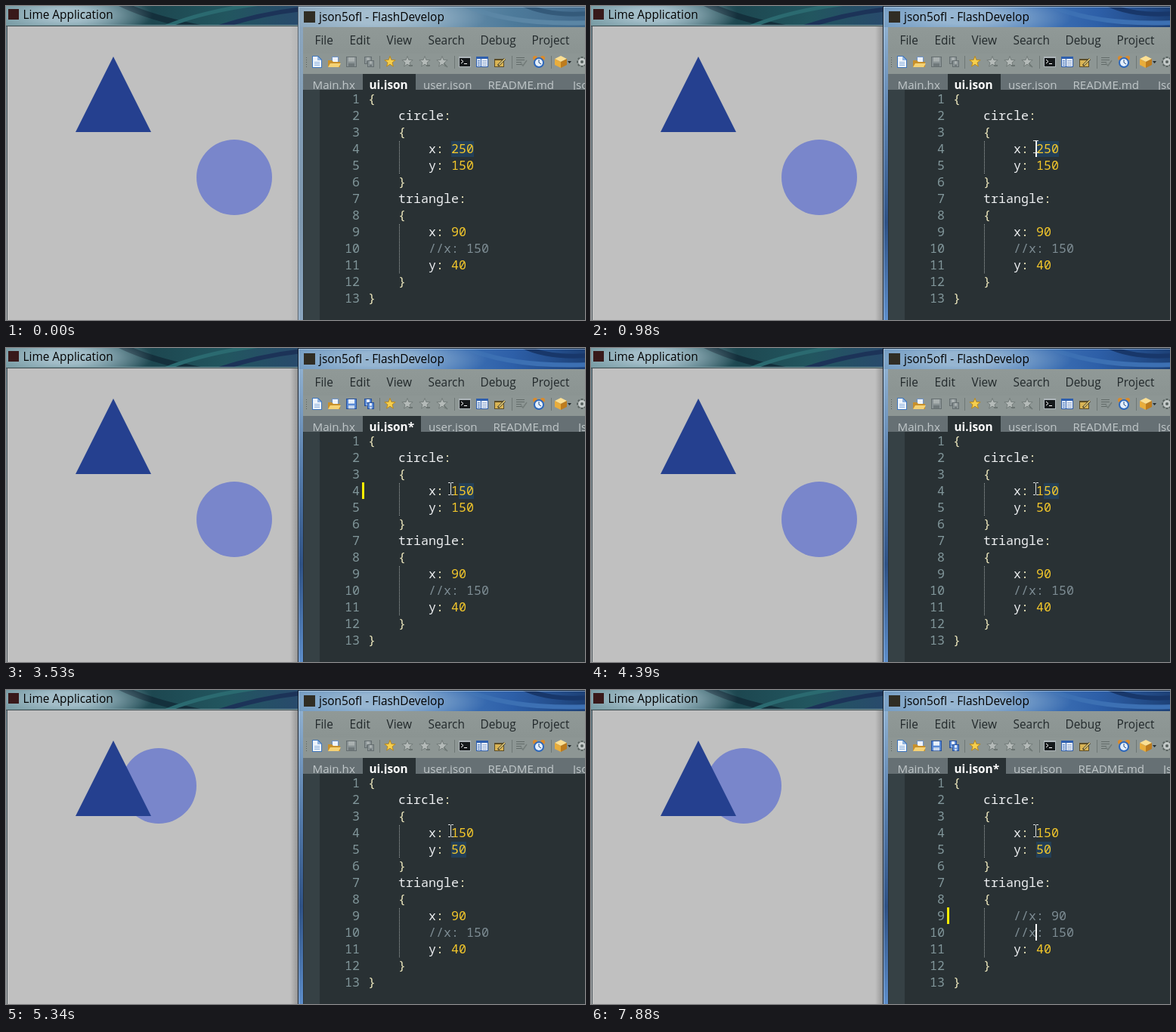
Recreate the animation shown at these times as an HTML page with a canvas. Size 766 by 416 pixels, loop 8000 ms.

```html
<!DOCTYPE html>
<html lang="en">
<head>
<meta charset="utf-8">
<title>Live JSON reload</title>
<style>
html, body { margin: 0; width: 100%; height: 100%; overflow: hidden; background: #c0c0c0; }
canvas { display: block; }
</style>
</head>
<body>
<canvas id="stage" width="766" height="416"></canvas>
<script>
const W = 766, H = 416, LOOP = 8000;
const ctx = document.getElementById('stage').getContext('2d');
const UI = '"Open Sans", "Noto Sans", sans-serif';
const MONO = '"Noto Sans Mono", "DejaVu Sans Mono", monospace';
const ROW = 22, TOP = 112, COL = 10, LEFT = 479;
const C = {
  bg: '#293134', key: '#eceef0', brace: '#f0eabf', num: '#f3c72b',
  note: '#7d8c93', lineNo: '#81969a', match: '#f3db2e', mark: '#233f58'
};

// [time, line, x]; line 0 hides the caret
const CARET = [
  [0, 0, 0], [980, 4, 588], [1440, 0, 0], [1990, 4, 588], [2620, 4, 598],
  [3070, 5, 598], [3530, 0, 0], [3700, 5, 588], [4230, 0, 0], [4860, 5, 588],
  [5240, 0, 0], [5790, 5, 588], [6250, 6, 528], [6430, 7, 588], [6620, 8, 528],
  [6800, 9, 588], [7180, 10, 588], [7560, 9, 588], [7720, 10, 588]
];
// [time, line, x, width]
const MARK = [
  [0, 4, 589, 30], [2370, 4, 589, 20], [2620, 4, 599, 20], [4690, 0, 0, 0], [4860, 5, 589, 20]
];

const at = (keys, t) => keys.filter(k => k[0] <= t).pop();
const rowTop = n => TOP + ROW * (n - 1);

function rect(x, y, w, h, color) {
  ctx.fillStyle = color;
  ctx.fillRect(x, y, w, h);
}

function poly(points, color) {
  ctx.fillStyle = color;
  ctx.beginPath();
  points.forEach(([x, y]) => ctx.lineTo(x, y));
  ctx.closePath();
  ctx.fill();
}

function disc(x, y, r, color) {
  ctx.fillStyle = color;
  ctx.beginPath();
  ctx.arc(x, y, r, 0, Math.PI * 2);
  ctx.fill();
}

function line(points, color, width = 1) {
  ctx.strokeStyle = color;
  ctx.lineWidth = width;
  ctx.beginPath();
  points.forEach(([x, y]) => ctx.lineTo(x, y));
  ctx.stroke();
}

function text(str, x, y, color, font, align = 'left') {
  ctx.font = font;
  ctx.textAlign = align;
  ctx.fillStyle = color;
  ctx.fillText(str, x, y);
}

function gradient(x0, y0, x1, y1, colors) {
  const g = ctx.createLinearGradient(x0, y0, x1, y1);
  colors.forEach((c, i) => g.addColorStop(i / (colors.length - 1), c));
  return g;
}

function glow(x, y, rx, ry, alpha) {
  ctx.save();
  ctx.translate(x, y);
  ctx.scale(rx, ry);
  const g = ctx.createRadialGradient(0, 0, 0.3, 0, 0, 1);
  g.addColorStop(0, `rgba(190,210,222,${alpha})`);
  g.addColorStop(1, 'rgba(190,210,222,0)');
  disc(0, 0, 1, g);
  ctx.restore();
}

function streak(x0, y0, cx, cy, x1, y1, color, width) {
  ctx.strokeStyle = color;
  ctx.lineWidth = width;
  ctx.beginPath();
  ctx.moveTo(x0, y0);
  ctx.quadraticCurveTo(cx, cy, x1, y1);
  ctx.stroke();
}

function clipTo(x, y, w, h, draw) {
  ctx.save();
  ctx.beginPath();
  ctx.rect(x, y, w, h);
  ctx.clip();
  draw();
  ctx.restore();
}

function leftWindow(moved, active) {
  clipTo(0, 0, 388, 27, () => {
    rect(0, 0, 388, 27, gradient(0, 0, 388, 0, ['#6b9199', '#5f8a92', '#1d4750', '#22565f', '#284a6c']));
    streak(150, -4, 190, 16, 262, 30, '#14303c', 8);
    streak(205, 30, 260, 6, 345, -4, '#2b6a70', 5);
    streak(275, 30, 335, 10, 392, 4, '#1c3358', 6);
    glow(82, 12, 112, 28, 0.7);
  });
  rect(0, 25, 388, 1, '#7e9da3');
  rect(0, 26, 388, 1, '#3c4b50');
  rect(0, 27, 1, H, gradient(0, 27, 0, H, ['#6d8791', '#8c979c', '#b3b5b5']));
  rect(1, 27, 1, H, '#4b545a');
  rect(2, 27, 385, H, '#c0c0c0');
  rect(3, 4, 14, 14, '#38191a');
  text('Lime Application', 22.5, 17, '#000', `15.4px ${UI}`);

  if (moved) disc(202, 127, 50, '#7986cb');
  else disc(302, 227, 50, '#7986cb');
  poly([[142, 67], [192, 167], [92, 167]], '#25408f');

  rect(376, 27, 10, H, gradient(376, 0, 386, 0, ['rgba(0,0,0,0)', `rgba(0,0,0,${active ? 0.22 : 0.06})`]));
}

function frame(active) {
  clipTo(386, 0, W - 386, 29, () => {
    rect(386, 0, 380, 29, active
      ? gradient(386, 0, W, 0, ['#6d97c0', '#5a8abd', '#4478b9', '#2d5fa8', '#1d4177'])
      : gradient(386, 0, W, 0, ['#86a3bb', '#7f9fb8', '#6b91ad', '#4d7a9a', '#426a8c']));
    const [light, dark] = active ? ['#3c70b3', '#18376a'] : ['#5b86a5', '#345a7a'];
    streak(600, -4, 660, 26, 770, 22, light, 6);
    streak(680, -4, 715, 14, 770, 10, dark, 6);
    glow(496, 15, 140, 30, 0.6);
    rect(386, 0, 380, 1, active ? '#16293f' : '#4b5e70');
    rect(387, 1, 379, 1, 'rgba(220,235,245,.45)');
  });
  rect(386, 0, 1, H, active ? '#14202f' : '#4e5c69');
  rect(387, 28, 6, H, active
    ? gradient(0, 28, 0, H, ['#8fb0d0', '#587fae', '#2f5286', '#5d8ecb'])
    : gradient(0, 28, 0, H, ['#8ba6bf', '#829db6', '#7e98b0', '#8ba6c0']));
  rect(387, 2, 1, H, 'rgba(225,238,248,.45)');
  rect(394, 7, 15, 15, '#302d24');
  text('json5ofl - FlashDevelop', 414, 20, '#000', `15.4px ${UI}`);
}

function star(x, y, fill, edge) {
  ctx.beginPath();
  for (let i = 0; i < 10; i++) {
    const a = i * Math.PI / 5 - Math.PI / 2, r = i % 2 ? 3.2 : 7.5;
    ctx.lineTo(x + r * Math.cos(a), y + r * Math.sin(a));
  }
  ctx.closePath();
  ctx.fillStyle = fill;
  ctx.fill();
  ctx.strokeStyle = edge;
  ctx.lineWidth = 1;
  ctx.stroke();
}

function floppy(x, y, s, on) {
  rect(x, y, s, s, on ? '#27509a' : '#656e70');
  rect(x + 1, y + 1, s - 2, s - 2, on ? '#5b8bd6' : '#899294');
  rect(x + 3, y + 1, s - 6, s * 0.4, on ? '#e8f0fb' : '#a9b0b0');
  rect(x + 3, y + s * 0.65, s - 6, s * 0.3, on ? '#c8d8ee' : '#6f787a');
}

function toolbar(dirty) {
  rect(393, 28, 373, 35, gradient(0, 28, 0, 63, ['#909997', '#8b9492']));
  rect(393, 63, 373, 27, '#8d9694');
  [['File', 408], ['Edit', 454], ['View', 503], ['Search', 558], ['Debug', 627], ['Project', 695]]
    .forEach(([s, x]) => text(s, x + 0.5, 51, '#22292b', `15.4px ${UI}`));

  for (let y = 68; y < 82; y += 3) rect(397, y, 1, 1, '#59625f');
  [494, 593, 669, 721].forEach(x => rect(x, 66, 1, 17, '#6e7775'));

  poly([[405, 66], [413, 66], [418, 71], [418, 82], [405, 82]], '#3f76bd');
  poly([[406, 67], [412, 67], [417, 72], [417, 81], [406, 81]], '#eef4fb');
  poly([[412, 67], [417, 72], [412, 72]], '#8fb3e0');
  for (let y = 74; y < 80; y += 2) rect(408, y, 7, 1, '#8fb3e0');

  rect(431, 67, 9, 11, '#6e93c8');
  rect(432, 68, 7, 9, '#eef3fa');
  poly([[426, 72], [431, 72], [433, 74], [442, 74], [442, 81], [426, 81]], '#c8902b');
  poly([[429, 76], [443, 76], [440, 81], [426, 81]], '#f5d274');

  floppy(450, 67, 14, dirty);
  floppy(474, 67, 10, dirty);
  floppy(478, 72, 9, dirty);

  star(508, 74, '#f6cf4e', '#b98a20');
  [531, 554, 577].forEach((x, i) => {
    star(x, 74, '#b4bab8', '#747d7b');
    if (i < 2) rect(x + 2, 78, 5, 2, '#6b7472');
    else line([[x + 2, 76], [x + 7, 81]], '#6b7472', 1.5);
  });

  rect(599, 67, 16, 14, '#aeb6ba');
  rect(600, 69, 14, 11, '#15191b');
  line([[602, 71], [605, 73.5], [602, 76]], '#fff');
  rect(606, 76, 4, 1, '#fff');

  rect(622, 67, 16, 14, '#2e5fae');
  rect(623, 70, 5, 10, '#dbe7f7');
  rect(629, 70, 8, 10, '#fff');
  for (let y = 72; y < 80; y += 2) {
    rect(624, y, 3, 1, '#5c82bd');
    rect(630, y, 6, 1, '#8ba6d0');
  }

  poly([[646, 70], [659, 70], [659, 81], [646, 81]], '#5d4d26');
  rect(647, 72, 11, 8, '#d9b455');
  line([[651, 79], [660, 70]], '#3f3a2b', 3);
  line([[652, 78], [660, 70]], '#f0d67c', 1.5);

  for (let i = 0; i < 4; i++) rect(675, 68 + i * 3, i < 2 ? 11 : 7, 1, '#626b69');
  line([[681, 76], [684, 79], [689, 72]], '#737c7a', 1.5);

  disc(700, 69, 3, '#d98b2d');
  disc(710, 69, 3, '#d98b2d');
  disc(705, 75, 7, '#2c67bb');
  disc(705, 75, 5, '#e5effb');
  line([[705, 71], [705, 75], [708, 77]], '#234a82');

  poly([[734, 66], [742, 70], [734, 74], [726, 70]], '#fbdf93');
  poly([[726, 70], [734, 74], [734, 82], [726, 78]], '#e8ad3c');
  poly([[742, 70], [734, 74], [734, 82], [742, 78]], '#bd7c1e');
  poly([[743, 73], [748, 73], [745.5, 76]], '#20282a');

  for (let i = 0; i < 4; i++) {
    const a = i * Math.PI / 4, dx = 7 * Math.cos(a), dy = 7 * Math.sin(a);
    line([[762 - dx, 74 - dy], [762 + dx, 74 + dy]], '#596260', 3);
  }
  disc(762, 74, 5, '#c3c9c8');
  disc(762, 74, 2, '#596260');
}

function tabs(star) {
  const shift = star ? 7 : 0, font = `15.1px ${UI}`;
  rect(393, 90, 373, 22, '#667074');
  rect(472, 90, 70 + shift, 22, C.bg);
  text('Main.hx', 405.5, 110, '#c0c7c9', font);
  text(star ? 'ui.json*' : 'ui.json', 480.5, 110, '#fff', `bold 15.4px ${UI}`);
  text('user.json', 552 + shift, 110, '#c0c7c9', font);
  text('README.md', 637.5 + shift, 110, '#c0c7c9', font);
  text('Json5.hx', 750 + shift, 110, '#c0c7c9', font);
}

const pair = (key, val) => [8, [key, C.key], [': ', C.brace], [val, C.num]];
const note = str => [8, [str, C.note]];

function code(t, caret) {
  const x = t < 2370 ? '250' : t < 2620 ? '50' : '150';
  const y = t < 3700 ? '150' : '50';
  const braceColor = n => caret[1] === n ? C.match : C.brace;
  const nested = (s, n) => [4, [s, braceColor(n)]];
  return [
    [0, ['{', C.brace]],
    [4, ['circle', C.key], [':', C.brace]],
    nested('{', 6),
    pair('x', x),
    pair('y', y),
    nested('}', 6),
    [4, ['triangle', C.key], [':', C.brace]],
    nested('{', 8),
    t < 7720 ? pair('x', '90') : note('//x: 90'),
    note('//x: 150'),
    pair('y', '40'),
    nested('}', 8),
    [0, ['}', C.brace]]
  ];
}

function editor(t) {
  const font = `16.67px ${MONO}`, caret = at(CARET, t), mark = at(MARK, t);
  rect(393, 111, 373, H, C.bg);
  rect(394, 111, 21, H, '#364145');
  if (mark[1]) rect(mark[2], rowTop(mark[1]) + 1, mark[3], ROW - 1, C.mark);

  for (const [from, to] of [[178, 222], [288, 354]])
    for (let y = from + 1; y < to; y += 2) rect(520, y, 1, 1, '#a3aaa9');

  const unsaved = t >= 2370 && t < 4390;
  const bars = [unsaved && 4, unsaved && t >= 3700 && 5, t >= 7720 && 9];
  bars.filter(Boolean).forEach(n => rect(471, rowTop(n), 3, ROW, '#ffee00'));

  code(t, caret).forEach(([indent, ...parts], i) => {
    const base = rowTop(i + 1) + 17;
    text(i + 1, 468, base, C.lineNo, font, 'right');
    let col = indent;
    for (const [str, color] of parts) {
      text(str, LEFT + col * COL, base, color, font);
      col += str.length;
    }
  });
  if (caret[1]) rect(caret[2], rowTop(caret[1]), 2, ROW, '#fff');
}

function pointer(t) {
  if (t < 130) return;
  const p = Math.min(1, (Math.floor((t - 130) / 95) + 1) / 7);
  const e = 1 - (1 - p) ** 2;
  const x = Math.round(720 - 132 * e), y = Math.round(425 - 239 * e);
  const c = '#dcdfe0';
  rect(x, y - 7, 1, 15, c);
  for (const dy of [-8, 8]) {
    rect(x - 3, y + dy, 3, 1, c);
    rect(x + 1, y + dy, 3, 1, c);
  }
}

function draw(t) {
  const active = t >= 980;
  const edited = (t >= 2370 && t < 4390) || t >= 7720;
  const dirty = (t >= 2490 && t < 4390) || t >= 7880;
  leftWindow(t >= 5340, active);
  frame(active);
  toolbar(dirty);
  tabs(edited);
  editor(t);
  pointer(t);
}

const start = performance.now();
function tick() {
  draw((performance.now() - start) % LOOP);
  requestAnimationFrame(tick);
}
tick();
</script>
</body>
</html>
```
